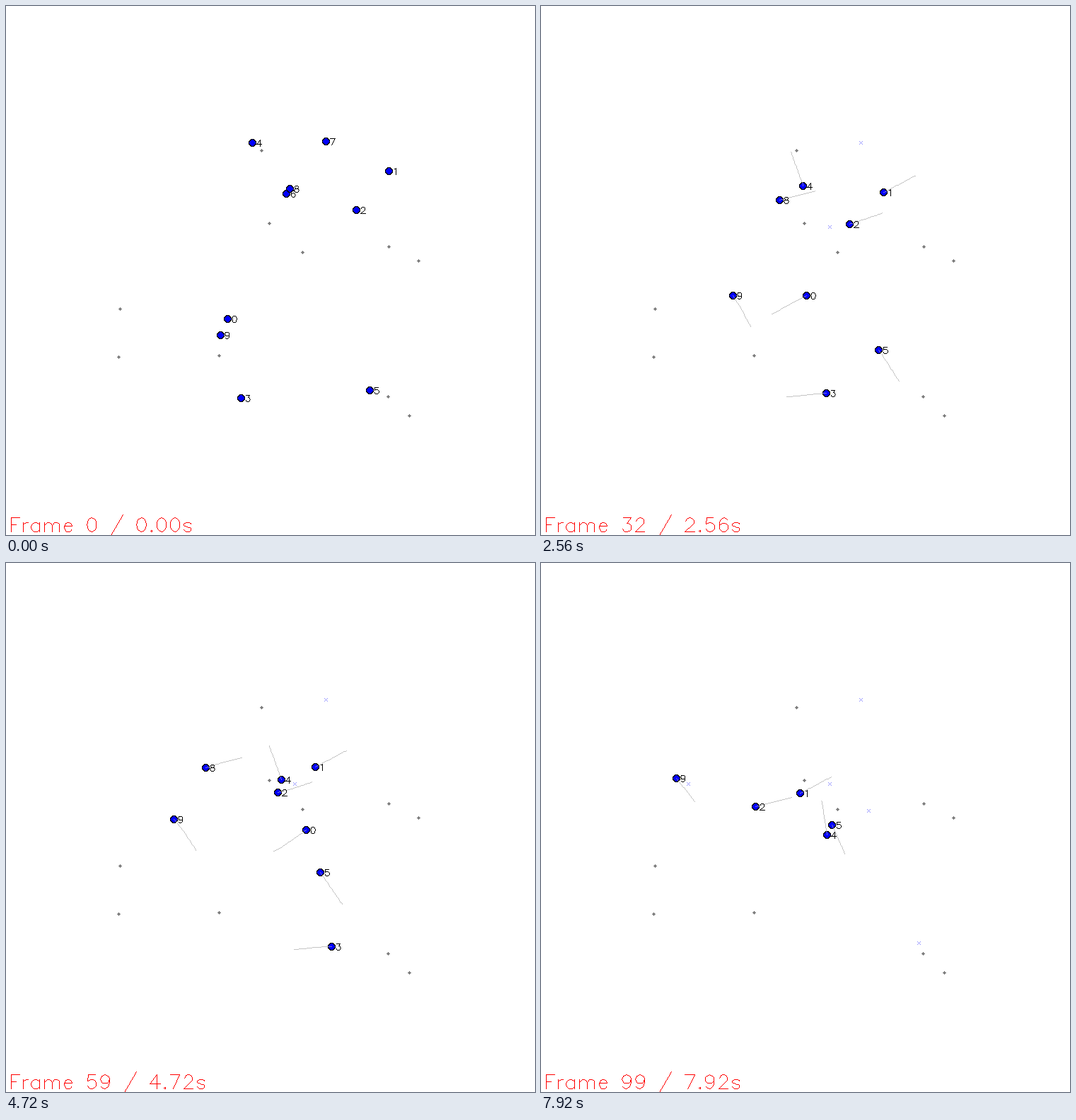
Recreate the animation shown at these times as a matplotlib script. Size 748 by 748 pixels, loop 8 s.

```python
from itertools import pairwise

import numpy as np
import matplotlib.pyplot as plt
from matplotlib.animation import FuncAnimation
from matplotlib.collections import PolyCollection

SIZE, DPI, FRAMES, STEP_MS = 748, 100, 100, 80
TRAIL = 25

WHITE, BLACK, GREY = (1, 1, 1), (0, 0, 0), (0.5, 0.5, 0.5)
BLUE, LILAC, RED = (0, 0, 1), (0.59, 0.59, 1), (1, 0, 0)
TRAIL_GREY = (0.67, 0.67, 0.67)

GOALS = [(361, 204), (372, 307), (419, 348), (541, 340), (583, 360),
         (161, 428), (159, 496), (301, 494), (540, 552), (570, 579)]

# Each walk: frame of its last point, then points evenly spaced in time.
WALKS = [
    (81, (313, 442), (391, 400), (463, 350)),
    (99, (541, 233), (366, 325)),
    (99, (495, 288), (403, 319), (303, 344)),
    (95, (332, 554), (437, 543), (534, 537)),
    (99, (348, 193), (371, 256), (394, 320), (404, 384)),
    (99, (514, 543), (476, 484), (435, 424), (411, 370)),
    (24, (396, 265), (408, 312)),
    (2, (452, 191), (452, 193)),
    (94, (401, 258), (307, 281), (208, 312)),
    (99, (303, 465), (279, 422), (250, 378), (217, 337), (191, 304)),
]


def arc(cx, cy, rx, ry, start, stop):
    count = max(4, round(abs(stop - start) / 22.5) + 1)
    angle = np.radians(np.linspace(start, stop, count))
    return list(zip(cx + rx * np.cos(angle), cy + ry * np.sin(angle)))


def ring(cx, cy, rx, ry):
    return arc(cx, cy, rx, ry, 0, 360)


def build_glyphs():
    """Single-stroke letters, 21 units high: advance width and strokes."""
    stem = [(4, 14), (4, 0)]
    hump = [(4, 10)] + arc(10, 9, 5, 5, 120, 0) + [(15, 0)]
    six = arc(11, 11, 7, 10, 45, 180) + arc(10.5, 6.5, 6.5, 6.5, 180, 540)
    nine = [(20 - x, 21 - y) for x, y in six]
    digits = [
        [ring(10, 10.5, 7, 10.5)],
        [[(6, 17), (8, 18), (11, 21), (11, 0)]],
        [arc(10, 15, 6, 6, 170, -35) + [(3, 0), (17, 0)]],
        [[(5, 21), (16, 21), (10, 13)] + arc(10, 6.5, 7, 6.5, 90, -155)],
        [[(13, 0), (13, 21), (3, 7), (18, 7)]],
        [[(15, 21), (5, 21), (4, 12)] + arc(10, 7, 7, 7, 125, -155)],
        [six],
        [[(3, 21), (17, 21), (7, 0)]],
        [ring(10, 16.5, 6, 4.5), ring(10, 6, 7, 6)],
        [nine],
    ]
    glyphs = {str(n): (20, strokes) for n, strokes in enumerate(digits)}
    glyphs.update({
        " ": (16, []),
        "/": (22, [[(20, 25), (2, -7)]]),
        ".": (10, [ring(5, 1, 1, 1)]),
        "F": (18, [[(4, 0), (4, 21), (17, 21)], [(4, 11), (12, 11)]]),
        "r": (13, [stem, arc(12, 8, 8, 6, 180, 90)]),
        "a": (19, [[(15, 14), (15, 0)], arc(9.5, 7, 6.5, 7, 35, 325)]),
        "m": (30, [stem, hump, [(x + 11, y) for x, y in hump]]),
        "e": (18, [[(3, 8), (15, 8)] + arc(9, 7, 6, 7, 10, 325)]),
        "s": (17, [arc(8.5, 11, 5.5, 3, 10, 250) + arc(8.5, 3.5, 5.5, 3.5, 70, -170)]),
    })
    return glyphs


GLYPHS = build_glyphs()


def snap(points):
    return np.floor(np.asarray(points, float) + 0.5)


def trace(points):
    """Grid cells along a one-cell-wide polyline."""
    cells = set()
    for a, b in pairwise(snap(points)):
        steps = int(np.abs(b - a).max())
        cells.update(map(tuple, snap(np.linspace(a, b, steps + 1)).tolist()))
    return cells


def disc(center, radius, norm=np.hypot):
    x, y = center
    reach = range(-int(radius), int(radius) + 1)
    return {(x + u, y + v) for u in reach for v in reach if norm(u, v) <= radius}


def diamond(center, radius):
    return disc(center, radius, lambda u, v: abs(u) + abs(v))


def cross(center):
    return disc(center, 3, lambda u, v: abs(u) if abs(u) == abs(v) and abs(u) < 3 else 9)


def lettering(text, x, baseline, scale):
    cells = set()
    for char in text:
        width, strokes = GLYPHS[char]
        for stroke in strokes:
            cells |= trace([(x + scale * u, baseline - scale * v) for u, v in stroke])
        x += scale * width
    return cells


def build_track(last, *points):
    times = np.linspace(0, last, len(points))
    frames = np.arange(FRAMES)
    return snap(np.column_stack([np.interp(frames, times, axis) for axis in zip(*points)]))


TRACKS = [build_track(*walk) for walk in WALKS]


def paint(canvas, cells, color, alpha=1):
    for cell in cells:
        under = canvas.get(cell, WHITE)
        canvas[cell] = tuple(alpha * c + (1 - alpha) * u for c, u in zip(color, under))


def compose(frame):
    canvas = {}
    for goal in GOALS:
        paint(canvas, diamond(goal, 2), GREY)

    active = []
    for agent, track in enumerate(TRACKS):
        last = WALKS[agent][0]
        if frame < last or last == FRAMES - 1:
            active.append((agent, track[max(0, frame - TRAIL):frame + 1]))
        else:
            paint(canvas, cross(track[-1]), LILAC)

    for agent, path in active:
        paint(canvas, disc(path[-1], 5.4), BLACK)
        paint(canvas, disc(path[-1], 4.2), BLUE)
        paint(canvas, trace(path), TRAIL_GREY, alpha=0.7)
    for agent, path in active:
        x, y = path[-1]
        paint(canvas, lettering(str(agent), x + 5, y + 5, 0.45), BLACK)

    text = f"Frame {frame} / {frame * STEP_MS / 1000:.2f}s"
    paint(canvas, lettering(text, 3, 743, 0.95), RED)
    return canvas


fig = plt.figure(figsize=(SIZE / DPI, SIZE / DPI), dpi=DPI, facecolor="white")
ax = fig.add_axes([0, 0, 1, 1])
ax.set_xlim(0, SIZE)
ax.set_ylim(SIZE, 0)
ax.axis("off")
dots = PolyCollection([], edgecolors="none", linewidths=0)
dots.set_snap(False)
ax.add_collection(dots, autolim=False)
SQUARE = np.array([(0, 0), (1, 0), (1, 1), (0, 1)])


def update(frame):
    canvas = compose(frame)
    corners = np.array(list(canvas))
    dots.set_verts(corners[:, None, :] + SQUARE)
    dots.set_facecolor(np.array(list(canvas.values()), float))
    return [dots]


anim = FuncAnimation(fig, update, frames=FRAMES, interval=STEP_MS,
                     repeat=True, repeat_delay=0, blit=False)
plt.show()
```
